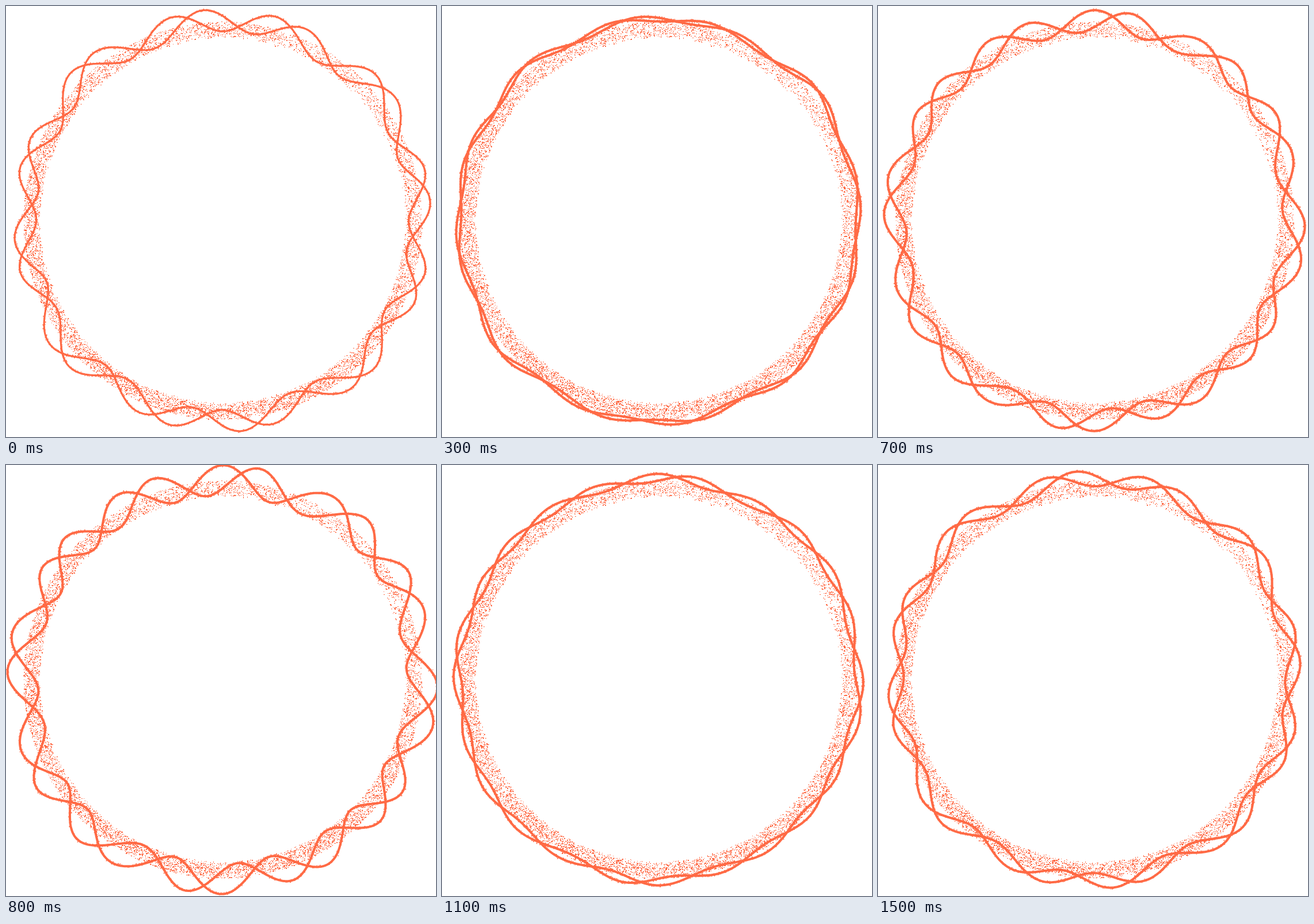
These frames come from a looping animation (747 by 750 pixels, 1.6 s). An HTML page with a canvas:

```html
<!DOCTYPE html>
<html lang="en">
<head>
<meta charset="utf-8">
<title>Wavy ring</title>
<style>
  html, body { margin: 0; width: 100%; height: 100%; overflow: hidden; background: #fff; }
  canvas { position: absolute; left: 0; top: 0; width: 747px; height: 750px; }
</style>
</head>
<body>
<canvas id="grain" width="747" height="750"></canvas>
<canvas id="waves" width="747" height="750"></canvas>
<script>
const CX = 376, CY = 373.5, STEP = 100, LOOP = 1600;
const COLOR = '#ff6a45';

// Crossings of the two strands over half a turn, at both ends of the morph.
const ANGLE_A = [4.6, 19.3, 35, 50.3, 66, 80.1, 94.8, 109, 123.3, 138.5, 154.3, 170.1];
const ANGLE_B = [5.1, 19.7, 36.4, 51, 65.3, 81.4, 96.9, 112.3, 126.3, 140.4, 155.3, 170.2];
const RADIUS_A = [338, 357, 329.5, 361.5, 332.5, 354, 332, 355, 331, 361, 329.6, 358];
const RADIUS_B = [356.5, 336, 355, 343, 354, 336, 356.5, 337, 350.5, 337, 351.7, 337];

// Morph position for each step out; the way back mirrors it.
const MORPH = [0, 0.15, 0.26, 0.38, 0.54, 0.7, 0.85, 1, 1.19];

const lerp = (a, b, u) => a + (b - a) * u;

function seeded(seed) {
  return () => {
    seed = (seed + 0x6d2b79f5) | 0;
    let t = Math.imul(seed ^ (seed >>> 15), 1 | seed);
    t = (t + Math.imul(t ^ (t >>> 7), 61 | t)) ^ t;
    return ((t ^ (t >>> 14)) >>> 0) / 4294967296;
  };
}

// Catmull-Rom through f(0), f(1), f(2), ...
function spline(f, p) {
  const i = Math.floor(p), t = p - i;
  const a = f(i - 1), b = f(i), c = f(i + 1), d = f(i + 2);
  return b + 0.5 * t * (c - a + t * (2 * a - 5 * b + 4 * c - d + t * (3 * (b - c) + d - a)));
}

function strand(u, side) {
  const even = lerp(13.3, -9, u);
  const odd = lerp(16, -16.5, u) * side;
  const swell = 3.5 * Math.max(0, Math.sin(Math.PI * u));
  const wrap = j => ((j % 12) + 12) % 12;
  const angle = j => lerp(ANGLE_A[wrap(j)], ANGLE_B[wrap(j)], u) + 180 * Math.floor(j / 12);
  const base = j => lerp(RADIUS_A[wrap(j)], RADIUS_B[wrap(j)], u) + (j % 2 ? -even : even);
  const points = [];
  for (let i = 0; i <= 1440; i++) {
    const p = i / 60, w = Math.PI * p;
    const a = spline(angle, p) * Math.PI / 180;
    const r = spline(base, p) + swell - even * Math.cos(w) - odd * Math.sin(w);
    points.push([CX + r * Math.sin(a), CY - r * Math.cos(a)]);
  }
  return points;
}

function drawWaves(g, k) {
  const rnd = seeded(40 + k);
  const width = k ? 4 : 3.2;
  g.clearRect(0, 0, 747, 750);
  g.strokeStyle = g.fillStyle = COLOR;
  g.lineJoin = 'round';
  for (const side of [-1, 1]) {
    const points = strand(MORPH[k], side);
    g.lineWidth = width;
    g.beginPath();
    points.forEach(([x, y]) => g.lineTo(x, y));
    g.stroke();
    // Crumbly edge
    for (const [x, y] of points) {
      const spread = width + 1.4, size = 1 + rnd();
      g.fillRect(x + (rnd() - 0.5) * spread - size / 2,
                 y + (rnd() - 0.5) * spread - size / 2, size, size);
    }
  }
}

function drawGrain(g) {
  const rnd = seeded(7);
  g.fillStyle = COLOR;
  for (let i = 0; i < 13500; i++) {
    const a = rnd() * 2 * Math.PI;
    const depth = rnd();
    const r = 317 + 29 * depth;
    const heavy = 0.66 + 0.2 * Math.cos(a - 3.75) + 0.06 * Math.cos(2 * a - 4.6);
    const edge = Math.min(1, 0.35 + depth * 3);
    const w = rnd() < 0.55 ? 1 : 2, h = rnd() < 0.75 ? 1 : 2;
    if (rnd() > heavy * edge) continue;
    g.fillRect(Math.round(376 + r * Math.sin(a)), Math.round(373 - r * Math.cos(a)), w, h);
  }
}

const context = id => document.getElementById(id).getContext('2d');
const waves = context('waves');
const start = performance.now();
let shown = -1;

function tick() {
  const t = Math.max(0, performance.now() - start) % LOOP;
  const n = Math.floor(t / STEP);
  const k = n > 8 ? 16 - n : n;
  if (k !== shown) drawWaves(waves, shown = k);
  requestAnimationFrame(tick);
}

drawGrain(context('grain'));
tick();
</script>
</body>
</html>
```
